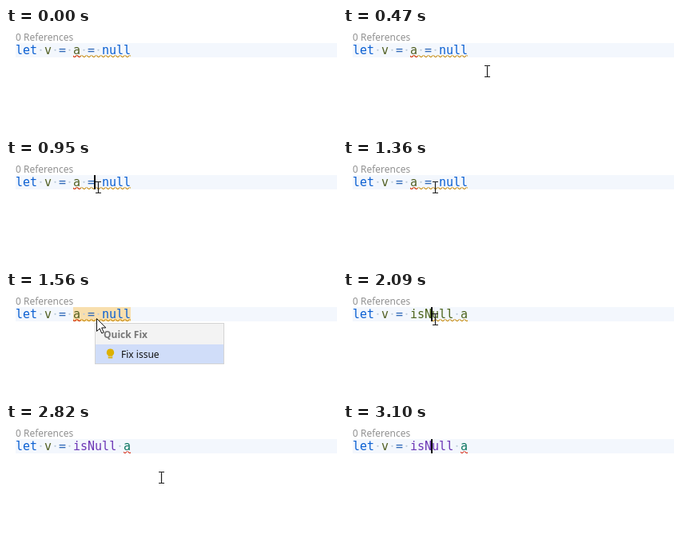
Write an HTML page that moves like this. It is 414 by 131 pixels and loops after 3.43 s.

```html
<!DOCTYPE html>
<html lang="en">
<head>
<meta charset="utf-8">
<title>Quick fix</title>
<style>
html, body { margin: 0; width: 100%; height: 100%; overflow: hidden; background: #fff; }
svg { display: block; width: 414px; height: 131px; }
text { white-space: pre; }
.code { font: 15px "DejaVu Sans Mono", "Noto Sans Mono", monospace; }
.ui { font: 12px "Noto Sans", "Open Sans", sans-serif; }
.kw { fill: #0a5fd2; }
.id { fill: #515f22; }
.op { fill: #3069b8; }
.dot { fill: #bccbda; }

.anim { animation: 3430ms step-end infinite; }
.before { animation-name: before; }
.menu { animation-name: menu; }
.after { animation-name: after; }
.warn { animation-name: warn; }
.error { animation-name: error; }
.call { animation-name: call; }
.arg { animation-name: arg; }
.caret { animation-name: caret; }
.beam { animation-name: beam; }

@keyframes before { 0% { opacity: 1 } 60.93%, 100% { opacity: 0 } }
@keyframes after { 0% { opacity: 0 } 60.93%, 100% { opacity: 1 } }
@keyframes menu { 0% { opacity: 0 } 45.48% { opacity: 1 } 60.93%, 100% { opacity: 0 } }
@keyframes warn { 0% { opacity: 0 } 60.93% { opacity: 1 } 62.97%, 100% { opacity: 0 } }
@keyframes error { 0% { opacity: 0 } 62.97%, 100% { opacity: 1 } }
@keyframes call { 0% { fill: #4c641c } 74.34%, 100% { fill: #6c36b5 } }
@keyframes arg { 0% { fill: #4c641c } 74.34%, 100% { fill: #0b7560 } }
@keyframes caret {
  0% { opacity: 0 }
  26.23% { opacity: 1 }
  39.65% { opacity: 0 }
  60.93% { opacity: 1 }
  76.38% { opacity: 0 }
  90.37%, 100% { opacity: 1 }
}
/* I-beam: drifts in from the lower right, overshoots, settles, leaves */
@keyframes beam {
  0% { transform: translate(-40px, -40px) }
  5.83% { transform: translate(252px, 88px) }
  7.87% { transform: translate(241px, 82px) }
  9.91% { transform: translate(224px, 74px) }
  11.66% { transform: translate(203px, 64px) }
  13.7% { transform: translate(180px, 54px) }
  15.74% { transform: translate(158px, 46px) }
  17.49% { transform: translate(141px, 41px) }
  19.53% { transform: translate(131px, 39px) }
  21.57% { transform: translate(105px, 33px) }
  23.61% { transform: translate(115px, 34px) }
  45.48% { transform: translate(-40px, -40px) }
  60.93% { transform: translate(115px, 34px) }
  76.38% { transform: translate(126px, 38px) }
  78.42% { transform: translate(153px, 49px) }
  80.46% { transform: translate(194px, 67px) }
  82.5% { transform: translate(238px, 89px) }
  84.25% { transform: translate(273px, 106px) }
  86.29% { transform: translate(295px, 116px) }
  88.33%, 100% { transform: translate(-40px, -40px) }
}
</style>
</head>
<body>
<svg viewBox="0 0 414 131">
  <defs>
    <path id="wave" d="M5.5 0L2.5 3H1.1L4.1 0zM4 0L6 2V.6L5.4 0zM0 2L1 3H2.4L0 .6z"/>
    <pattern id="amber" width="6" height="3" patternUnits="userSpaceOnUse">
      <use href="#wave" fill="#c88a0a"/>
    </pattern>
    <pattern id="red" width="6" height="3" patternUnits="userSpaceOnUse">
      <use href="#wave" fill="#d8301a"/>
    </pattern>
    <circle id="dot" cy="27.8" r="1.15"/>
  </defs>

  <rect x="12" y="19" width="402" height="18" fill="#f3f7fd"/>
  <text class="ui" x="12" y="16" fill="#919191">0 References</text>

  <g class="anim menu">
    <rect x="84" y="19" width="72" height="18" fill="#f8dfae"/>
  </g>

  <g class="code">
    <text class="kw" x="12" y="33">let</text>
    <text class="id" x="48" y="33">v</text>
    <text class="op" x="66" y="33">=</text>
  </g>
  <g class="dot">
    <use href="#dot" x="43.5"/><use href="#dot" x="61.5"/><use href="#dot" x="79.5"/>
  </g>

  <g class="anim before">
    <g class="code">
      <text class="id" x="84" y="33">a</text>
      <text class="op" x="102" y="33">=</text>
      <text class="kw" x="120" y="33">null</text>
    </g>
    <g class="dot"><use href="#dot" x="97.5"/><use href="#dot" x="115.5"/></g>
    <g transform="translate(84 34)">
      <rect width="72" height="3" fill="url(#amber)"/>
      <rect width="9" height="3" fill="url(#red)"/>
    </g>
  </g>

  <g class="anim after">
    <g class="code">
      <text class="anim call" x="84" y="33">isNull</text>
      <text class="anim arg" x="147" y="33">a</text>
    </g>
    <use class="dot" href="#dot" x="142.5"/>
  </g>
  <g class="anim warn">
    <rect transform="translate(111 34)" width="45" height="3" fill="url(#amber)"/>
  </g>
  <g class="anim error">
    <rect transform="translate(147 34)" width="9" height="3" fill="url(#red)"/>
  </g>

  <rect class="anim caret" x="110" y="19" width="2" height="18"/>

  <g class="anim menu">
    <rect x="111.5" y="39.5" width="161" height="51" fill="#f3f3f3" stroke="#d4d4d4"/>
    <text class="ui" x="122" y="58" fill="#777" style="font-weight:600">Quick Fix</text>
    <rect x="112" y="66" width="160" height="24" fill="#d0ddf9"/>
    <path d="M130.5 71.5a4.7 4.7 0 0 0-2.7 8.5v3.5h5.4v-3.5a4.7 4.7 0 0 0-2.7-8.5z" fill="#ddb100"/>
    <path d="M128 81.3h5" stroke="#d0ddf9" stroke-width=".7"/>
    <text class="ui" x="144" y="83" fill="#111">Fix issue</text>
    <path d="M113.5 33.5v16l3.7-3.5 2.6 6 2.5-1.1-2.6-5.9h5.1z" fill="#fff" stroke="#111"/>
  </g>

  <g class="anim beam">
    <path d="M-3-6.500h3l.5.5.5-.5h3M.5-6.500v14M-3 7.500h3l.5-.5.5.5h3" fill="none" stroke="#1c1c1c" stroke-width="1.200"/>
  </g>
</svg>
</body>
</html>
```
